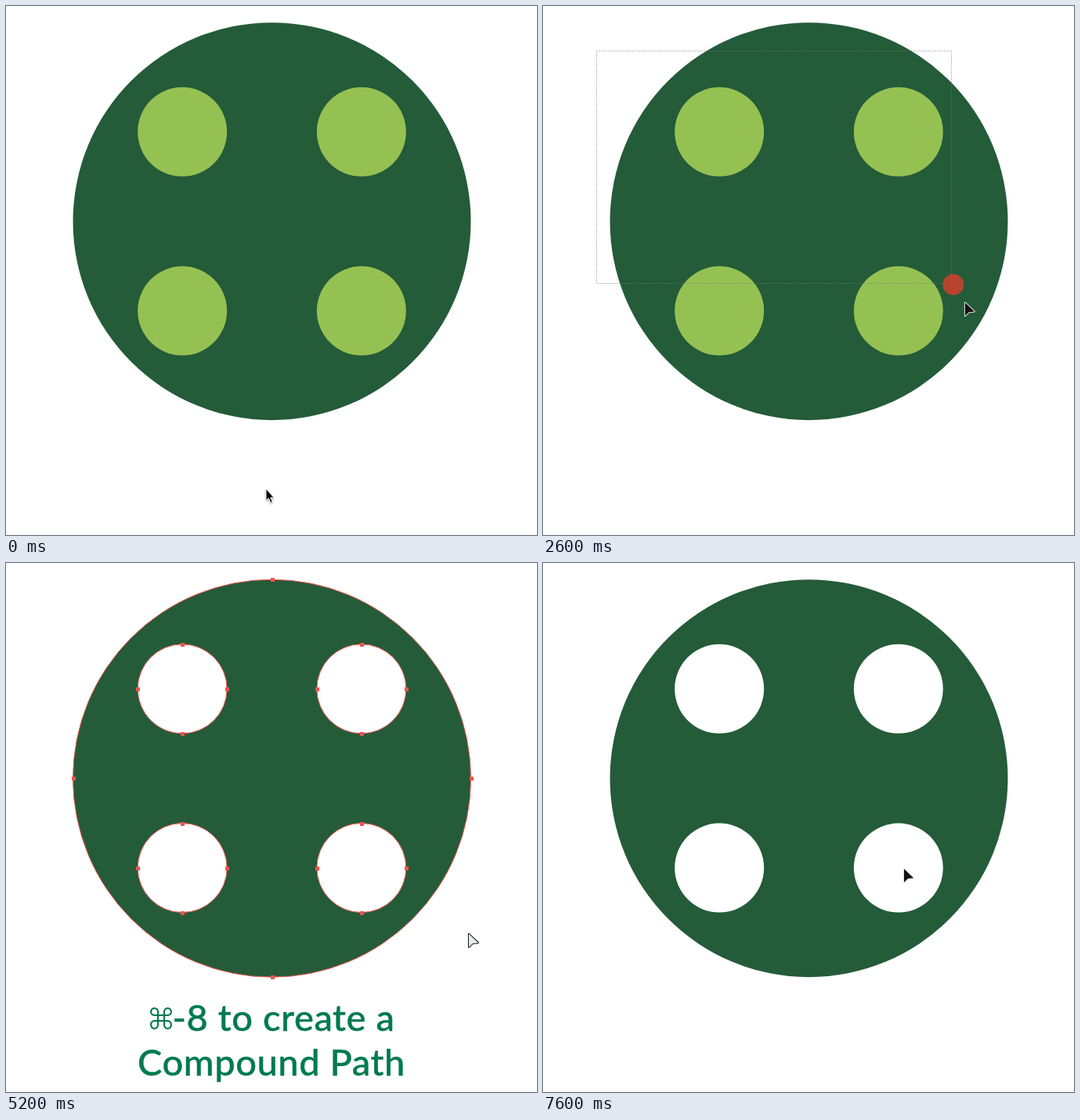
Write an HTML page that moves like this. It is 678 px wide and 676 px high and loops after 8000 ms.

```html
<!DOCTYPE html>
<html lang="en">
<head>
<meta charset="utf-8">
<title>Compound path</title>
<style>
  html, body { margin: 0; width: 100%; height: 100%; overflow: hidden; background: #fff; }
  svg { display: block; width: 678px; height: 676px; }
  .outline { fill: none; stroke: #ee5350; stroke-width: 1; }
  .anchor { fill: #ee5350; }
  .handle { fill: #fff; stroke: #d9423f; stroke-width: 1; }
  .caption { fill: #007a4f; text-anchor: middle; font: 500 47px Lato, "Open Sans", sans-serif; letter-spacing: .012em; }
  .words { stroke: #007a4f; stroke-width: .4; }
  .command { font: 300 37px Inter, "DejaVu Sans", sans-serif; letter-spacing: 0; }
  .pointer { stroke-linejoin: round; }
  #arrow { fill: #111; stroke: #dfe8e2; stroke-width: 2; paint-order: stroke; }
  #arrow.direct { fill: #e4eeee; stroke: #222; stroke-width: 2.2; }
</style>
</head>
<body>
<svg viewBox="0 0 678 676">
  <g id="shapes"></g>
  <g id="hover">
    <path class="outline" d="M337.5 273.5l4 4m0-4l-4 4"/>
  </g>
  <g id="selection"></g>
  <g id="centers"></g>
  <g id="outerAnchors"></g>
  <g id="bounds"></g>
  <rect id="marquee" x="68.5" y="57.5" fill="none" stroke="#777" stroke-dasharray="1 2"/>
  <g id="caption" class="caption">
    <text class="command" x="198" y="595">⌘</text>
    <text class="words" x="354.5" y="598">-8 to create a</text>
    <text class="words" x="339" y="655">Compound Path</text>
  </g>
  <circle id="ripple" fill="#dc3d2d"/>
  <g id="cursor">
    <path id="system" class="pointer" d="M0 0V15L3.3 12L6 18L8.3 17L5.8 11.2H10.2Z"
      fill="#000" stroke="#fff" style="filter:drop-shadow(0 1px 1px #0006)"/>
    <path id="arrow" class="pointer" d="M0 0V17L4.8 12.2L12 11.4Z"/>
    <rect id="badge" x="9.5" y="16" width="5.5" height="5.5" fill="#111" stroke="#cfe0d2"/>
  </g>
</svg>
<script>
const LOOP = 8000, STEP = 200, TRAIL = 35;
const el = id => document.getElementById(id);
const disc = { x: 339.5, y: 275.2, r: 254 };
const sides = [-1, 1];
const dots = sides.flatMap(v => sides.map(u =>
  ({ x: disc.x + u * 114.35, y: disc.y + v * 114.35, r: 57 })));

function add(parent, tag, attrs) {
  const node = document.createElementNS('http://www.w3.org/2000/svg', tag);
  setAll(node, attrs);
  return el(parent).appendChild(node);
}
function setAll(node, attrs) {
  for (const name in attrs) node.setAttribute(name, attrs[name]);
}
const circle = (parent, c, attrs) => add(parent, 'circle', { cx: c.x, cy: c.y, r: c.r, ...attrs });
const outline = (parent, c) => circle(parent, c, { class: 'outline' });
const square = (parent, x, y, name, inset) => add(parent, 'rect',
  { x: Math.round(x) - inset, y: Math.round(y) - inset, width: 5, height: 5, class: name });
const anchor = (parent, x, y) => square(parent, x, y, 'anchor', 2);
function anchors(parent, { x, y, r }) {
  for (const s of sides) {
    anchor(parent, x + s * r, y);
    anchor(parent, x, y + s * r);
  }
}

circle('shapes', disc, { fill: '#245b38' });
const fills = dots.map(dot => circle('shapes', dot));
outline('hover', disc);
outline('selection', disc);
for (const dot of dots) {
  outline('selection', dot);
  anchors('selection', dot);
  anchor('centers', dot.x, dot.y);
}
anchor('centers', disc.x - .5, disc.y);
anchors('outerAnchors', disc);
add('bounds', 'rect', { x: 85.5, y: 21.5, width: 508, height: 508, class: 'outline', style: 'stroke:#c9423f' });
for (const u of [-1, 0, 1]) for (const v of [-1, 0, 1])
  if (u || v) square('bounds', disc.x + u * disc.r, disc.y + v * disc.r, 'handle', 2.5);

const progress = (t, from, to) => Math.min(1, Math.max(0, (t - from) / (to - from)));
const easeInOut = (p, power) => p < .5 ? (2 * p) ** power / 2 : 1 - (2 - 2 * p) ** power / 2;
const mix = (a, b, p) => a + (b - a) * p;

// Each move bends from the previous stop towards `via` on its way to `stop`.
const home = [332, 617];
const moves = [
  { from: 400, to: 1600, via: [173, 393], stop: [69, 57] },
  { from: 1800, to: 3000, via: [430, 134], stop: [591, 474] },
  { from: 5800, to: 6800, via: [503, 408], stop: [415, 341] },
  { from: 7200, to: 7400, via: [457, 385], stop: [499, 429] },
  { from: 7400, to: 7600, via: [480, 410], stop: [461, 391] }
];
function pointerAt(t) {
  let point = home;
  for (const { from, to, via, stop } of moves) {
    const p = easeInOut(progress(t, from, to), 3);
    point = point.map((a, i) => mix(mix(a, via[i], p), mix(via[i], stop[i], p), p));
  }
  return point;
}

// The pressed mark stays small, then spreads and fades after release.
const clicks = [{ down: 1900, up: 3100 }, { down: 5600, up: 5600 }];
function rippleAt(t) {
  const click = clicks.findLast(({ down }) => t > down);
  const p = click ? progress(t, click.up, click.up + 225) : 1;
  return { r: mix(13.5, 53.5, p), opacity: mix(.8, 0, p) };
}

const captionAt = t =>
  easeInOut(progress(t, 4000, 4800), 2) - easeInOut(progress(t, 5800, 6800), 2);
const show = (id, on) => el(id).style.display = on ? '' : 'none';

function render(time) {
  const t = Math.floor(time % LOOP / STEP) * STEP;
  const within = (from, to) => t >= from && t < to;
  const compound = t >= 5200, hovering = within(1000, 1400);
  const selected = within(3200, 5800), keyDown = within(4200, 5400);
  const [x, y] = pointerAt(t);
  const [trailX, trailY] = pointerAt(t - TRAIL);

  for (const node of fills) node.setAttribute('fill', compound ? '#fff' : '#95c153');
  show('hover', hovering);
  show('badge', hovering);
  show('selection', selected);
  show('centers', selected && !compound);
  show('outerAnchors', keyDown);
  show('bounds', selected && !keyDown);

  show('marquee', within(2000, 3200));
  setAll(el('marquee'), {
    width: Math.max(0, Math.round(trailX - 69)),
    height: Math.max(0, Math.round(trailY - 57))
  });
  setAll(el('ripple'), { cx: trailX + 1.5, cy: trailY + 2, ...rippleAt(t) });
  el('caption').setAttribute('opacity', captionAt(t));

  el('cursor').setAttribute('transform', `translate(${x} ${y})`);
  show('system', t < 600);
  show('arrow', t >= 600);
  el('arrow').classList.toggle('direct', keyDown);
}

const start = performance.now();
function tick() {
  render(performance.now() - start);
  requestAnimationFrame(tick);
}
tick();
</script>
</body>
</html>
```
